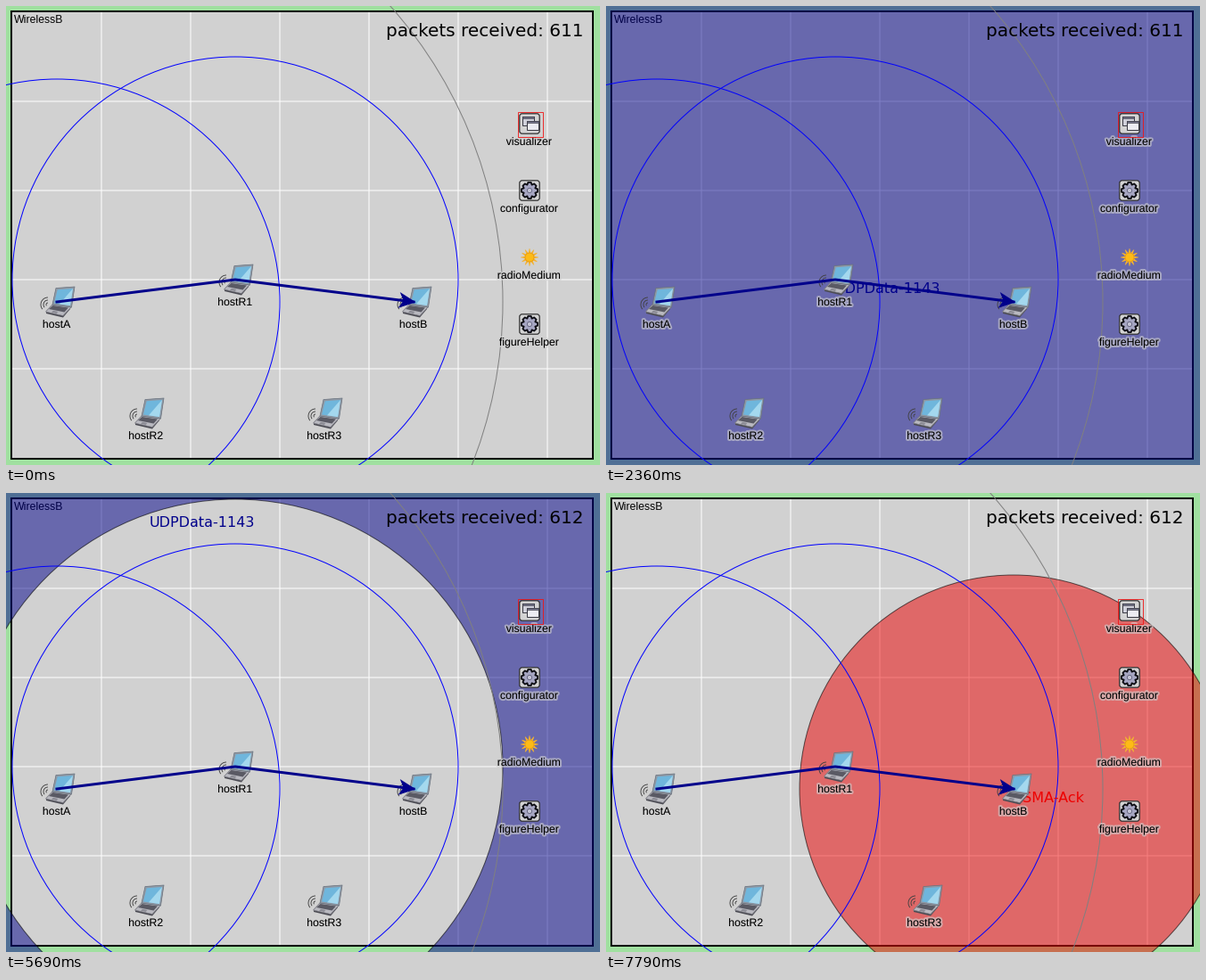
Write a matplotlib script that moves like this. It is 666 px wide and 515 px high and loops after 8 s.

```python
import numpy as np
import matplotlib.pyplot as plt
from matplotlib.animation import FuncAnimation
from matplotlib.colors import to_rgba
from matplotlib.patches import Arc, Circle, FancyBboxPatch, PathPatch, Polygon, Rectangle
from matplotlib.path import Path
from matplotlib.patheffects import withStroke

W, H, DPI = 666, 515, 100
PX = 72 / DPI                     # one pixel in points
LOOP, STEP = 8000, 40
START, TICK = 500, 7500 / 36      # the simulator redraws once per tick
NAVY, RED, GREY = "#00008b", "#ee0000", "#d1d1d1"

HOSTS = {
    "hostA": (57, 332),
    "hostB": (457, 332),
    "hostR1": (257, 307),
    "hostR2": (157, 457),
    "hostR3": (357, 457),
}
MODULES = {
    "visualizer": (587, 132),
    "configurator": (587, 207),
    "radioMedium": (587, 282),
    "figureHelper": (587, 357),
}

# sender, label, colour, drift direction of the label
DATA = ("hostR1", "UDPData-1143", NAVY, (-0.318, -0.948))
ACK = ("hostB", "CSMA-Ack", RED, (0.0, 0.0))
FULL = 1200
REACH = np.hypot(200, 25)         # distance between neighbouring hosts
VIS = "visualizer"

# first tick, signal, outer radius, inner radius, marked module
TIMELINE = [
    (-1, None, 0, 0, VIS),
    (0, DATA, 0, 0, VIS),
    (1, DATA, 60, 0, VIS),
    (2, DATA, 120, 0, VIS),
    (3, DATA, 180, 0, VIS),
    (4, DATA, 180, 0, "hostR2"),
    (5, DATA, 180, 0, "hostR3"),
    (6, DATA, 180, 0, "hostA"),
    (7, DATA, REACH, 0, "hostB"),
    (8, DATA, 240, 0, VIS),
    (9, DATA, FULL, 0, VIS),
    (12, DATA, FULL, 0, "hostR1"),
    (13, DATA, FULL, 0, "hostA"),
    (14, DATA, FULL, 0, "hostB"),
    (15, DATA, FULL, 0, VIS),
    (16, DATA, FULL, 60, VIS),
    (17, DATA, FULL, 120, VIS),
    (18, DATA, FULL, 180, VIS),
    (19, DATA, FULL, 180, "hostR2"),
    (20, DATA, FULL, 180, "hostR3"),
    (21, DATA, FULL, REACH, VIS),
    (22, DATA, FULL, REACH, "hostA"),
    (23, DATA, FULL, REACH, "hostB"),
    (24, DATA, FULL, 240, VIS),
    (25, DATA, FULL, 300, VIS),
    (26, None, 0, 0, VIS),
    (29, ACK, 0, 0, VIS),
    (30, ACK, 60, 0, VIS),
    (31, ACK, 120, 0, "hostR3"),
    (32, ACK, 160, 0, VIS),
    (33, ACK, 180, 0, "hostR1"),
    (34, ACK, REACH, 0, VIS),
    (35, ACK, 240, 0, VIS),
]
COUNT_TICK = 24

fig = plt.figure(figsize=(W / DPI, H / DPI), dpi=DPI, facecolor="#a0e0a0")
ax = fig.add_axes([0, 0, 1, 1])
ax.set_xlim(0, W)
ax.set_ylim(H, 0)
ax.axis("off")


def add(patch):
    return ax.add_patch(patch)


def poly(center, points, fill, z, edge="none", lw=0.7):
    xy = np.array(points, float) + center
    return add(Polygon(xy, fc=fill, ec=edge, lw=lw * PX, zorder=z, joinstyle="round"))


def write(x, y, text, size, z, font="DejaVu Sans", **kw):
    return ax.text(x, y, text, fontsize=size * PX, family=font, zorder=z,
                   va="baseline", **kw)


def caption(x, y, text):
    halo = withStroke(linewidth=4 * PX, foreground=GREY, alpha=0.6)
    write(x, y, text, 12.3, 6, "Liberation Sans", ha="center", path_effects=[halo])


def star(teeth, tip, root, width):
    """Outline of a wheel whose teeth take the given share of each sector."""
    pts = []
    for k in range(teeth):
        for f, r in ((-0.5, root), (-width, tip), (width, tip), (0.5, root)):
            a = 2 * np.pi * (k + f) / teeth
            pts.append((r * np.cos(a), r * np.sin(a)))
    return pts


def laptop(c):
    x, y = c
    for r in (2, 5, 8):
        add(Arc((x - 10, y + 3), 2 * r, 2 * r, theta1=140, theta2=270,
                ec="#404040", lw=0.9 * PX, zorder=5))
    poly(c, [(-12, 11), (7, 15), (15, 6), (15, 8), (7, 17.5), (-12, 13)], "#4c4c54", 5)
    poly(c, [(-5, 3), (16, 6), (7, 15.5), (-12.5, 11)], "#b9b9c0", 5, "#77777f")
    poly(c, [(-4.5, 4), (13, 6.5), (8.5, 11.5), (-9, 8)], "#5a5a64", 5)
    poly(c, [(-4, 9.8), (1.5, 11), (-0.5, 13), (-6, 11.6)], "#8b8b94", 5)
    poly(c, [(-1, -15.5), (20, -17), (16.5, 6), (-5, 3)], "#8f98a4", 5, "#66707c")
    poly(c, [(0.7, -13.7), (18, -15), (15, 4), (-3, 1.5)], "#6fb6dc", 5)
    poly(c, [(18, -15), (15, 4), (3, 2.3)], "#a4d8ee", 5)


def tile(c):
    x, y = c
    add(FancyBboxPatch((x - 8, y - 8), 16, 16, boxstyle="round,pad=3.2,rounding_size=3",
                       fc="#d4d4d4", ec="#2c2c2c", lw=1.2 * PX, zorder=5))


def window(c, dx, dy, w, h, fill):
    x, y = c[0] + dx, c[1] + dy
    add(Rectangle((x, y), w, h, fc=fill, ec="#3a3a44", lw=PX, zorder=5))
    add(Rectangle((x, y), w, 2, fc="#74748a", ec="#3a3a44", lw=0.6 * PX, zorder=5))


def gear(c):
    tile(c)
    poly(c, star(8, 9.2, 6.8, 0.24), "#a6a6c2", 5, "#0c0c12", 1.8)
    add(Circle(c, 2.6, fc="#c4c4d6", ec="#5c5c78", lw=0.8 * PX, zorder=5))


def sun(c):
    poly(c, star(12, 9.8, 5, 0.07), "#f2b233", 5)
    add(Circle(c, 5, fc="#fdbb16", ec="#e69a14", lw=0.8 * PX, zorder=5))


def ring(radius, center, colour):
    add(Circle(center, radius, fc="none", ec=colour, lw=PX, zorder=3))


def grid_line(xs, ys):
    ax.plot(xs, ys, color="white", lw=PX, zorder=0.5, snap=False)


def build_scene():
    add(Rectangle((6, 6), 652, 502, fc=GREY, ec="none", zorder=0))
    for x in range(107, 608, 100):
        grid_line([x, x], [7, 507])
    for y in range(107, 408, 100):
        grid_line([7, 657], [y, y])
    add(Rectangle((6, 6), 652, 502, fc="none", ec="black", lw=2 * PX, zorder=1))
    write(9, 19, "WirelessB", 12.3, 1, "Liberation Sans")

    ring(500, HOSTS["hostA"], "#808080")
    ring(250, HOSTS["hostA"], "#0000ff")
    ring(250, HOSTS["hostR1"], "#0000ff")

    for name, c in HOSTS.items():
        laptop(c)
        caption(c[0] - 0.5, c[1] + 29, name)
    for name, c in MODULES.items():
        caption(c[0] - 0.5, c[1] + 24, name)

    vis = MODULES[VIS]
    tile(vis)
    window(vis, -8.5, -8, 13, 10, "#d0d0da")
    window(vis, -3.5, -3, 13, 10, "#ececf2")
    gear(MODULES["configurator"])
    gear(MODULES["figureHelper"])
    sun(MODULES["radioMedium"])

    route = np.array([HOSTS[n] for n in ("hostA", "hostR1", "hostB")], float)
    ax.plot(*route.T, color=NAVY, lw=3 * PX, zorder=7, solid_joinstyle="miter")
    d = (route[2] - route[1]) / REACH
    side = np.array([-d[1], d[0]])
    tip = route[2] + 2.5 * d
    head = [0 * d, -19 * d + 9 * side, -14 * d, -19 * d - 9 * side]
    poly(tip, head, NAVY, 7)


build_scene()
wave = add(PathPatch(Path.unit_circle(), lw=PX, zorder=2))
signal_text = write(0, 0, "", 16, 4)
marker = add(Rectangle((0, 0), 1, 1, fc="none", ec="#f01414", lw=PX, alpha=0.85, zorder=8))
counter = write(426, 34, "", 20, 4)


def wave_path(center, outer, inner):
    unit = Path.unit_circle()
    parts = [Path(unit.vertices * outer + center, unit.codes)]
    if inner:
        # mirrored, so that it winds the other way and cuts a hole
        parts.append(Path(unit.vertices * [-inner, inner] + center, unit.codes))
    return Path.make_compound_path(*parts)


def mark(name):
    if name in HOSTS:
        (x, y), left, top, w, h = HOSTS[name], 22, 19, 44, 38
    else:
        (x, y), left, top, w, h = MODULES[name], 14, 14, 28, 28
    # on half pixels, so that the outline stays one pixel wide
    marker.set_bounds(x - left + 0.5, y - top + 0.5, w, h)


def update(i):
    t = (i + 1) * STEP
    tick = -1 if t < START else min(35, int((t - START) / TICK))
    _, signal, outer, inner, marked = [s for s in TIMELINE if s[0] <= tick][-1]

    mark(marked)
    counter.set_text(f"packets received: {612 if tick >= COUNT_TICK else 611}")
    signal_text.set_visible(signal is not None)
    wave.set_visible(outer > 0)
    if signal:
        sender, label, colour, drift = signal
        x, y = HOSTS[sender]
        signal_text.set_text(label)
        signal_text.set_color(colour)
        signal_text.set_position((x - 0.5 + inner * drift[0], y + 15 + inner * drift[1]))
        if outer:
            wave.set_path(wave_path((x, y), outer, inner))
            wave.set_facecolor(to_rgba(colour, 0.5))
            wave.set_edgecolor((0, 0, 0, 0.6))
    return wave, signal_text, marker, counter


anim = FuncAnimation(fig, update, frames=LOOP // STEP, interval=STEP,
                     repeat=True, repeat_delay=0, cache_frame_data=False)
plt.show()
```
